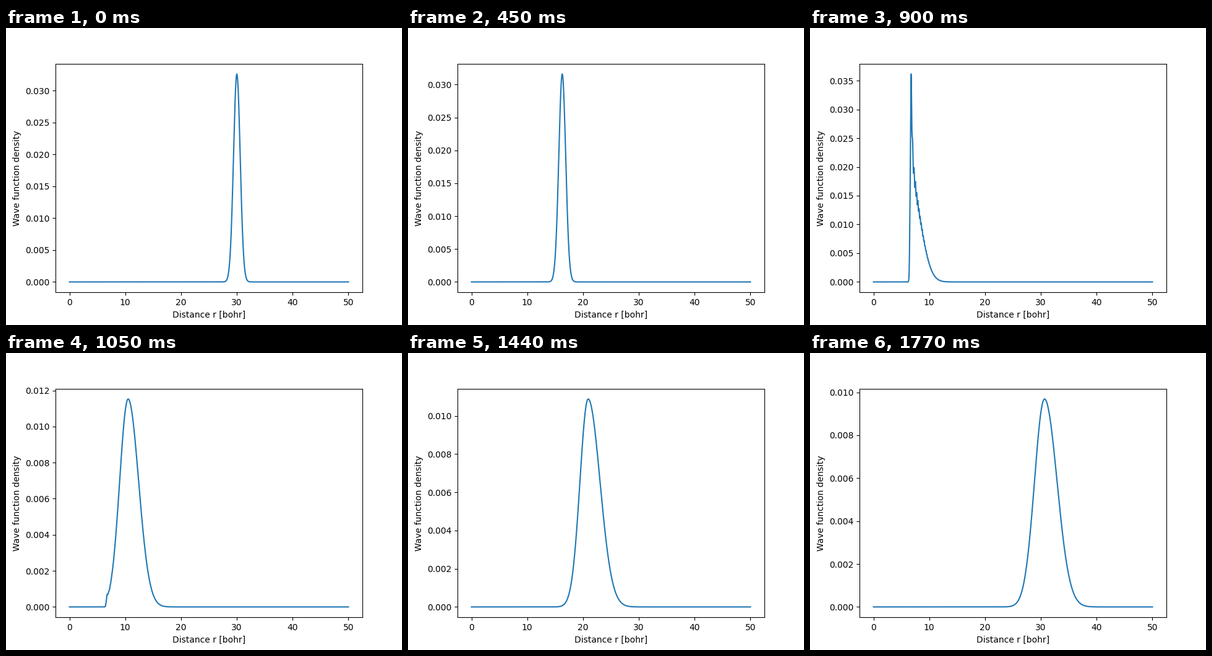
Recreate the animation shown at these times as a matplotlib script. Size 640 by 480 pixels, loop 1800 ms.

```python
import math

import matplotlib.pyplot as plt
import numpy as np
from matplotlib.animation import FuncAnimation

FRAMES, INTERVAL = 60, 30
POINTS = 1024
WALL, SOFT = 6.65, 0.8   # turning point and softness of the repulsive wall

r = np.linspace(0, 50, POINTS)
dr = r[1] - r[0]
edges = np.append(r - dr / 2, r[-1] + dr / 2)

# Packet path on the unfolded axis: negative is inbound, positive is outbound.
KNOTS = np.array([0, 8, 22, 30, 40, 48, 59.0])
CENTER = np.array([-24.137, -16.751, -4.479, 1.3, 8.11, 15.03, 24.787])
BACK = np.array([0.587, 0.631, 0.816, 1.69, 1.25, 1.45, 1.78])
FRONT = np.array([0.587, 0.631, 0.816, 1.69, 1.98, 2.13, 2.24])

erf = np.vectorize(math.erf)


def glide(t, values):
    """Cubic Hermite interpolation through the knots."""
    slope = np.gradient(values, KNOTS)
    i = min(np.searchsorted(KNOTS, t, side="right") - 1, len(KNOTS) - 2)
    h = KNOTS[i + 1] - KNOTS[i]
    u = (t - KNOTS[i]) / h
    return ((1 + 2 * u) * (1 - u) ** 2 * values[i]
            + u * (1 - u) ** 2 * h * slope[i]
            + u * u * (3 - 2 * u) * values[i + 1]
            + u * u * (u - 1) * h * slope[i + 1])


def split_cdf(s, mid, back, front):
    """Cumulative two-sided normal distribution."""
    z = s - mid
    width = np.where(z < 0, back, front)
    return (back + width * erf(z / width / math.sqrt(2))) / (back + front)


def blur(values, sigma):
    k = np.arange(-40, 41) * dr
    kernel = np.exp(-0.5 * (k / sigma) ** 2)
    return np.convolve(values, kernel / kernel.sum(), mode="same")


def density(t):
    shape = glide(t, CENTER), glide(t, BACK), glide(t, FRONT)
    reach = np.maximum(edges - WALL + SOFT, SOFT)
    s = np.sqrt(reach ** 2 - SOFT ** 2)
    sigma = 0.114 + 0.25 * math.exp(-((t - 27.5) / 1.3) ** 2)
    outbound = blur(np.diff(split_cdf(s, *shape)), sigma)
    inbound = blur(-np.diff(split_cdf(-s, *shape)), sigma)

    # Weak interference where both branches overlap
    x = r - WALL - 0.1
    phase = 2 * np.pi * x / 0.29 * (1 + 0.15 * x)
    overlap = np.sqrt(np.clip(outbound * inbound, 0, None))
    return outbound + inbound + 0.14 * overlap * np.cos(phase)


fig, ax = plt.subplots(figsize=(6.4, 4.8), dpi=100)
line, = ax.plot(r, np.zeros(POINTS), color="#1f77b4", lw=1.5)
ax.set_xlim(-2.5, 52.5)
ax.set_xlabel("Distance r [bohr]")
ax.set_ylabel("Wave function density")


def update(frame):
    rho = density(frame)
    line.set_ydata(rho)
    peak = rho.max()
    ax.set_ylim(-0.05 * peak, 1.05 * peak)
    return line,


anim = FuncAnimation(fig, update, frames=FRAMES, interval=INTERVAL,
                     repeat=True, repeat_delay=0, blit=False)
plt.show()
```
